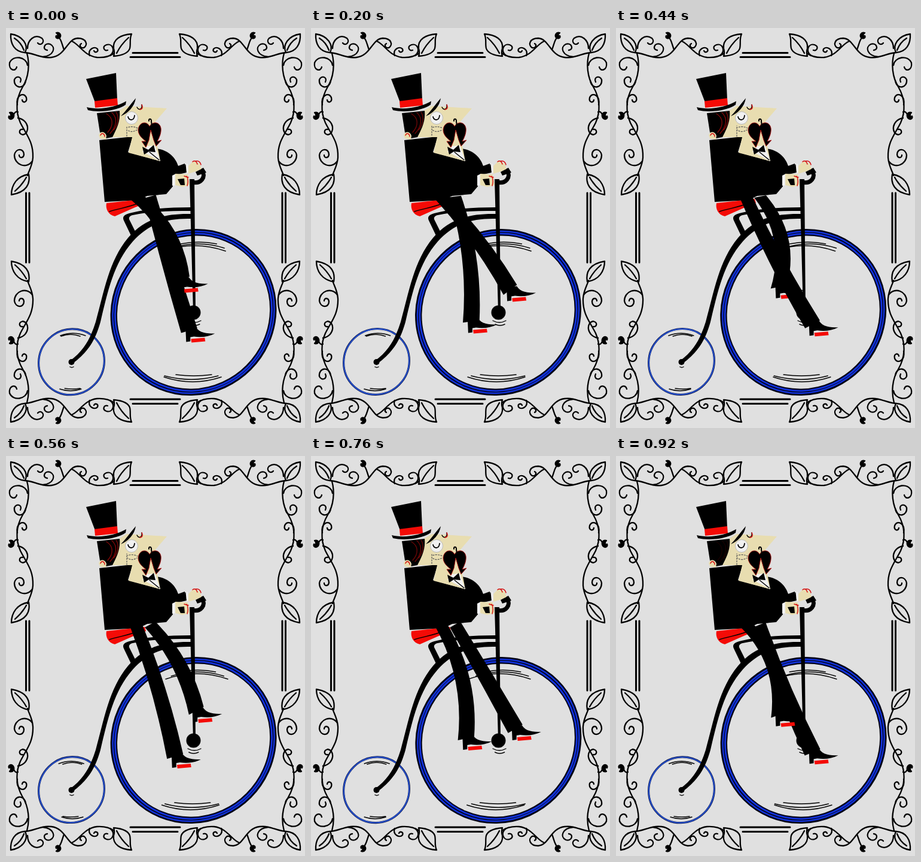
These frames come from a looping animation (500x667 px, 960 ms). An HTML page:

```html
<!DOCTYPE html>
<html lang="en">
<head>
<meta charset="utf-8">
<title>Penny-farthing rider</title>
<style>
html, body { margin: 0; width: 100%; height: 100%; overflow: hidden; background: #e0e0e0; }
svg { display: block; width: 500px; height: 667px; }
.line { fill: none; stroke: #000; stroke-linecap: round; stroke-linejoin: round; }
.ornament { stroke-width: 2.3; }
.thin { stroke-width: 1.4; }
.skin { fill: #e8ddb0; }
.white { fill: #f1f1f1; }
.red { fill: #f40b06; }
.redline { fill: none; stroke: #d40d0d; stroke-width: 1.4; stroke-linecap: round; }
.blue { stroke: #1233dc; }
</style>
</head>
<body>
<svg viewBox="0 0 500 667">
  <defs>
    <g id="corner">
      <path d="M8 10C7 26 14 40 32 41C38 28 28 13 8 10ZM14 17C22 22 27 29 30 37"/>

      <path d="M32 41C48 42 58 51 76 49C100 46 102 18 120 17C134 17 138 28 130 33C124 34 122 28 126 26"/>
      <path d="M62 48C80 46 84 32 74 27C64 24 60 36 69 37"/>
      <path d="M36 34C36 20 48 9 60 17C66 23 58 31 53 25"/>
      <path d="M97 36C94 29 93 20 88 15"/>
      <path fill="#000" d="M84 8C90 6 93 12 90 16C86 19 82 16 84 13C87 14 88 11 84 8Z"/>
      <path d="M110 22C124 28 130 46 152 49C166 50 174 47 181 42"/>
      <path d="M174 46C184 38 178 25 168 28C160 31 164 39 170 37"/>
      <path d="M140 46C136 36 148 29 153 35C155 40 149 42 147 38"/>
      <path d="M210 10C192 11 178 19 180 34C182 40 181 44 180 47C192 46 204 43 207 34C209 26 206 18 210 10ZM205 16C196 24 190 32 185 42"/>

      <path d="M35 42C40 60 38 82 28 98C16 118 16 140 24 158C34 178 46 190 45 216C44 230 38 238 36 246"/>
      <path d="M36 62C34 48 12 44 6 58C4 70 16 74 18 65"/>
      <path d="M33 88C30 104 12 100 14 86C18 78 28 82 24 90"/>
      <path d="M19 128C16 112 30 106 34 116C36 124 28 126 27 120"/>
      <path d="M20 140C16 138 14 142 12 146"/>
      <path fill="#000" d="M6 141C12 139 15 145 12 150C8 154 3 151 5 147C8 149 10 145 6 141Z"/>
      <path d="M20 150C40 154 40 176 28 178C20 176 22 168 28 169"/>
      <path d="M44 222C34 236 14 228 14 212C16 200 30 200 30 211C29 218 22 217 22 212"/>
      <path d="M9 278C9 262 18 247 38 244C41 260 34 274 9 278ZM15 272C22 266 29 258 34 249"/>
    </g>
  </defs>
  <rect width="500" height="667" fill="#e0e0e0"/>

  <g class="line">
    <g id="big">
      <ellipse rx="136" ry="130.5" stroke-width="11.4" stroke="#020318"/>
      <ellipse class="blue" rx="138" ry="132" stroke-width="2.4"/>
      <ellipse class="blue" rx="133.6" ry="128.6" stroke-width="2.8"/>
    </g>
    <g id="small">
      <ellipse rx="55.8" ry="54" stroke-width="3.2" stroke="#101b50"/>
      <ellipse class="blue" rx="55.6" ry="53.8" stroke-width="1.9" style="stroke:#2450d0"/>
    </g>
    <path id="glints" class="thin"/>
  </g>

  <g class="line ornament">
    <use href="#corner"/>
    <use href="#corner" transform="matrix(-1 0 0 1 500 0)"/>
    <use href="#corner" transform="matrix(1 0 0 -1 0 667)"/>
    <use href="#corner" transform="matrix(-1 0 0 -1 500 667)"/>
    <path stroke-width="3" d="M212 41.5H287M208 48.5H291M212 626.5H287M208 619H291M33.5 275V391M39 275V391M467.5 275V391M462 275V391"/>
  </g>

  <path class="red" d="M168 292L232 285L234 292L216 299L182 314C171 312 166 301 168 292Z"/>
  <path class="line thin" d="M173 306C188 301 205 299 222 292"/>
  <path d="M309 299C268 299 232 302 206 309C198 311 194 315 197 321L209 346L217 341L206 319C205 315 208 313 212 312C240 306 270 305 309 305Z"/>
  <path d="M309 310C258 309 228 322 204 350C172 388 164 440 150 490C142 515 132 537 107 555L111 560C140 538 150 518 158 490C170 440 180 392 212 356C236 330 262 317 309 318Z"/>
  <path class="line" stroke-width="7" stroke-linecap="butt" d="M311 257C326 261 335 248 328 238"/>
  <path d="M307 252L315 252L317 472H313ZM317 240L330 233L335 241L320 246Z"/>
  <circle cx="313.5" cy="474.5" r="12"/>
  <circle cx="109.5" cy="557" r="5"/>

  <g id="legs"></g>

  <path d="M156 187L212 181L204 207L258 222L248 201C268 201 283 214 288 230L299 226L302 241L280 246L279 264L268 277L236 280L222 287L165 290Z"/>

  <path class="skin" d="M189 138L202 130L269 134L250 156L253 196L258 222L205 208L211 182L172 182C184 169 190 154 189 138Z"/>
  <path d="M152 142L190 138C192 156 184 170 178 182L167 184L157 174Z"/>
  <path class="skin" d="M155 179C157 171 166 172 168 180L167 186L157 184Z"/>
  <path class="redline" d="M158 179C160 174 165 176 165 181"/>
  <path id="hair" class="redline" d="M168 143C180 150 180 163 170 174M177 141C188 151 184 165 174 176M184 140C190 150 187 162 180 170"/>
  <path class="white" d="M228 206L236 197L249 196L258 222Z"/>
  <path d="M228 198L238 203L247 195L250 207L239 206L231 211Z"/>
  <path class="line thin" d="M240 207L256 220"/>

  <path d="M134 85L184 75L186 120L149 124Z"/>
  <path class="red" d="M148 122L186 117L187 129L149 133Z"/>
  <path d="M135 132C155 137 182 133 201 122L200 128C184 139 154 141 137 137Z"/>

  <path d="M192 147C201 138 209 126 217 117C215 131 204 142 192 147Z"/>
  <circle class="white" cx="210" cy="150" r="10.5" stroke="#bbb"/>
  <path class="line" stroke-width="1.8" d="M204 148C206 155 214 155 215 146"/>
  <path class="line thin" d="M219 132C222 138 228 136 227 128"/>
  <path class="redline" d="M224 136C229 135 229 131 227 128"/>
  <path id="chain" class="line" stroke-width="1.2" stroke-dasharray="2 2.4" style="stroke:#555" d="M202 163V181M203 166C208 164 214 164 220 167M203 170C208 174 214 173 219 170"/>
  <path stroke="#b01010" stroke-width=".9" d="M240 164C235 154 222 157 221 170C221 179 229 185 234 189L227 189L234 199L239 187L242 170L247 187L251 197L260 187L253 189C257 182 260 174 259 167C257 156 245 155 240 164Z"/>
  <path class="line" stroke-width="2" d="M239 155C238 150 244 151 243 156L244 163"/>

  <path class="white" d="M299 226L304 227L305 241L302 242ZM278 246L284 243L284 262L278 263Z"/>
  <path class="skin" d="M305 230L313 222L324 226L327 235L318 239L305 243ZM283 243L304 244L307 262L295 265L283 262Z"/>
  <path d="M287 252L298 251L299 262L292 262Z"/>
  <path class="redline" d="M312 223C316 220 319 223 320 227M317 222C322 221 325 224 326 228M302 247C305 252 305 257 303 263M298 247L305 249"/>
  <path class="line thin" d="M300 228L301 240"/>
</svg>
<script>
const LOOP = 960, STEP = 40, HUB = [315.5, 479], CRANK = 42;
// crank angle from the top, over each half turn: [ms, degrees]
const TURN = [[0, -8], [80, 25], [200, 51], [360, 107], [440, 138], [480, 172]];
const $ = id => document.getElementById(id);
const f = v => v.toFixed(1);
const rnd = n => { const s = Math.sin(n * 91.7 + 3.1) * 4373.3; return s - Math.floor(s); };

function crankAngle(t) {
  const half = t % 480;
  const i = TURN.findIndex(k => half < k[0]);
  const [t0, a0] = TURN[i - 1], [t1, a1] = TURN[i];
  return a0 + (a1 - a0) * (half - t0) / (t1 - t0) + (t >= 480 ? 180 : 0);
}

function leg(hx, deg) {
  const rad = Math.PI / 180, a = deg * rad, hy = 281;
  const px = HUB[0] + CRANK * Math.sin(a), py = HUB[1] - CRANK * Math.cos(a);
  const ax = px - 15, ay = py - 16;
  const dx = ax - hx, dy = ay - hy, d = Math.hypot(dx, dy);
  const nx = dy / d, ny = -dx / d;
  // the knee bends most while the pedal rises behind the hub
  const bend = 2 * (8 + 12 * Math.cos(a - 310 * rad));
  const cx = (hx + ax) / 2 + nx * bend, cy = (hy + ay) / 2 + ny * bend;
  const at = (x, y, w) => f(x + nx * w) + ' ' + f(y + ny * w);
  return `<path d="M${at(hx, hy, -10)}Q${at(cx, cy, -12)} ${at(ax, ay, -14)}L${at(ax, ay, 14)}Q${at(cx, cy, 12)} ${at(hx, hy, 10)}Z"/>
    <g transform="translate(${f(px)} ${f(py)})">
      <path d="M-21-19L-4-22C2-12 14-11 28-11C18-6 6-4-7-6L-13-5L-13 2L-20 3Z"/>
      <path class="red" d="M-12-2L11-4L12 2L-11 4Z"/>
    </g>`;
}

// short speed line: centre, half width, sag
const arc = (x, y, w, sag) => `M${f(x - w)} ${f(y + sag)}Q${f(x)} ${f(y - sag)} ${f(x + w)} ${f(y + sag)}`;

function glints(n) {
  const j = k => (rnd(n * 7 + k) - .5) * 5;
  return arc(317 + j(1), 363, 52, 9) + arc(322 + j(2), 360, 44, 7) + arc(320 + j(3), 357, 30, 3) +
    arc(311 + j(4), 590, 48, -8) + arc(311 + j(5), 586, 45, -6) + arc(312 + j(6), 580, 30, -2) +
    arc(110 + j(7), 509, 21, 4) + arc(110 - j(7), 511, 16, 3) +
    arc(109 + j(8), 605, 18, -3) + arc(110 - j(8), 602, 13, -1) +
    arc(315, 491, 11, -3) + arc(315 + j(9) / 2, 496, 8, -2) + arc(110, 566, 3, -1);
}

let shown = -1;
function draw(now) {
  const n = Math.floor(now % LOOP / STEP);
  if (n !== shown) {
    shown = n;
    const a = crankAngle(n * STEP);
    $('legs').innerHTML = leg(241, a + 180) + leg(217, a);
    $('big').setAttribute('transform', `translate(${f(313.2 + rnd(n) - .5)} 474) rotate(-45)`);
    $('small').setAttribute('transform', `translate(109.5 ${f(556.3 + rnd(n + 40) * .6)}) rotate(-45)`);
    $('glints').setAttribute('d', glints(n));
    $('hair').style.opacity = n ? f(rnd(n + 9) * .6) : .6;
    $('chain').setAttribute('stroke-dashoffset', f(rnd(n + 70) * 4));
  }
  requestAnimationFrame(draw);
}
draw(performance.now());
</script>
</body>
</html>
```
